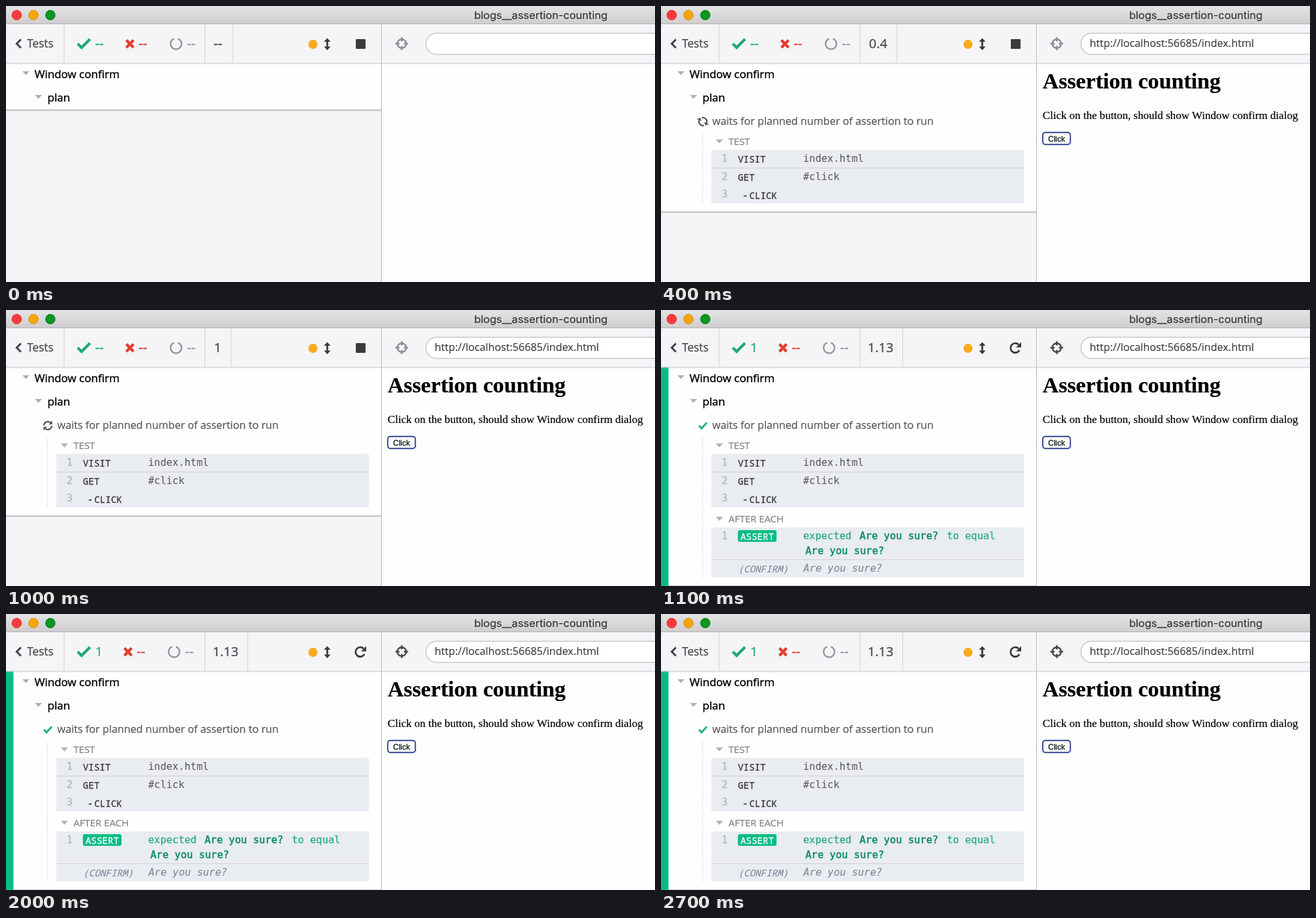
Recreate the animation shown at these times as an HTML page. Size 1000x425 px, loop 2800 ms.

```html
<!DOCTYPE html>
<html lang="en">
<head>
<meta charset="utf-8">
<title>Assertion counting</title>
<style>
html, body { margin: 0; width: 100%; height: 100%; overflow: hidden; background: #f5f4f6; }
svg { display: block; width: 100vw; height: 100vh; }
text { font: 16.25px "Open Sans", sans-serif; color: #55555a; fill: currentColor; stroke: currentColor; stroke-width: .2; white-space: pre; }
.bar { color: #404044; font-size: 17.3px; }
.num { font-size: 20px; }
.suite { font-size: 17.1px; color: #000; stroke-width: .4; }
.hook { font-size: 15px; color: #808087; }
.mono { font: 15.5px "DejaVu Sans Mono", monospace; stroke-width: 0; }
.cmd { font: 500 14.3px "Noto Sans Mono", "DejaVu Sans Mono", monospace; color: #36363b; stroke-width: .3; }
.idx { color: #a6adb8; text-anchor: middle; }
.serif { font: 17.1px "Liberation Serif", serif; color: #000; }
.ok { color: #1fa97a; stroke-width: .2; }
.strong { color: #0b8c5c; stroke-width: .5; }
.hint { color: #84849a; font-style: italic; stroke-width: .1; }
.dashes { stroke-width: .5; }
.line { stroke: #d3d2d5; fill: none; }
.caret { fill: #b0afb2; }
.row { fill: #e9ecf1; }
.stroke { fill: none; stroke-width: 2.4; }
</style>
</head>
<body>
<svg viewBox="0 0 1000 425" preserveAspectRatio="none">
  <defs>
    <linearGradient id="chrome" x2="0" y2="1">
      <stop stop-color="#e4e3e4"/><stop offset="1" stop-color="#cfcdcf"/>
    </linearGradient>
    <linearGradient id="shade" x2="0" y2="1">
      <stop stop-color="#a5a4a7"/><stop offset="1" stop-color="#f5f4f6"/>
    </linearGradient>
    <linearGradient id="fall" x2="0" y2="1">
      <stop stop-color="#d0cfd2"/><stop offset="1" stop-color="#d0cfd2" stop-opacity="0"/>
    </linearGradient>
    <path id="caret" class="caret" d="M0 0h11l-5.5 6z"/>
  </defs>

  <rect width="1000" height="425" fill="#f5f4f6"/>
  <rect x="579" y="88" width="421" height="337" fill="#fefefe"/>

  <!-- reporter panel -->
  <rect id="sheet" y="88" width="578" fill="#fefefe"/>
  <rect id="edge" width="578" height="3" fill="url(#shade)"/>
  <use href="#caret" x="25.2" y="100.5"/>
  <text class="suite" x="44" y="111">Window confirm</text>
  <use href="#caret" x="44.5" y="137"/>
  <text class="suite" x="64" y="147">plan</text>

  <g id="test">
    <text x="79" y="183">waits for planned number of assertion to run</text>
    <path id="rail" stroke="#c9c9cd" stroke-dasharray="1.5 1.5"/>
    <use href="#caret" x="84.5" y="205.5"/>
    <text class="hook" x="104" y="214">TEST</text>
    <rect class="row" x="77.5" y="221.5" width="481.5" height="82.5"/>
    <path class="line" d="M77.5 249.5H559"/>
    <text class="mono idx" x="98" y="240">1</text>
    <text class="cmd" x="118.5" y="241">VISIT</text>
    <text class="mono" x="219" y="240">index.html</text>
    <text class="mono idx" x="98" y="268">2</text>
    <text class="cmd" id="get" x="118.5">GET</text>
    <text class="mono" x="219" y="268">#click</text>
    <g id="pending">
      <rect x="77.5" y="277" width="481.5" height="27" fill="#dbe8f5"/>
      <rect x="77.5" y="277" width="2.5" height="27" fill="#3d88c4"/>
      <circle cx="98" cy="289.3" r="6.6" class="stroke" stroke="#6a9edc" stroke-dasharray="2.4 2.78"/>
    </g>
    <text class="mono idx" id="third" x="98" y="295">3</text>
    <text class="cmd" id="click" y="296.5"><tspan x="125.5">-</tspan><tspan x="136">CLICK</tspan></text>
  </g>

  <g id="sync" fill="none" stroke="#55555a" stroke-width="2.3">
    <path d="M-6 -1.2A6 6 0 0 1 4.6 -3.8M6 1.2A6 6 0 0 1 -4.6 3.8"/>
    <path stroke="none" fill="#55555a" d="M7.3 -6.8V-1H1.5zM-7.3 6.8V1H-1.5z"/>
  </g>

  <g id="done">
    <rect y="88" width="11.5" height="337" fill="#08bd82"/>
    <path class="stroke" stroke="#1fb17e" style="stroke-width:3" d="M58.5 178l4 4.2 8-8.7"/>
    <use href="#caret" x="84.5" y="318.5"/>
    <text class="hook" x="104" y="327">AFTER EACH</text>
    <rect class="row" x="77.5" y="335" width="481.5" height="77"/>
    <path class="line" d="M77.5 384.5H559"/>
    <text class="mono idx" x="98" y="353">1</text>
    <rect x="118.5" y="339" width="59.5" height="18" rx="3" fill="#08bd82"/>
    <text class="cmd" x="122.5" y="354" style="color:#fff">ASSERT</text>
    <text class="mono ok" x="219" y="353">expected</text>
    <text class="mono strong" x="306" y="353">Are you sure?</text>
    <text class="mono ok" x="440.5" y="353">to equal</text>
    <text class="mono strong" x="222.5" y="376">Are you sure?</text>
    <text class="cmd hint" x="119" y="404">(CONFIRM)</text>
    <text class="mono hint" x="219.5" y="403">Are you sure?</text>
  </g>

  <!-- page under test -->
  <g id="page">
    <text class="serif" x="588" y="127" style="font-size:34.2px;font-weight:700">Assertion counting</text>
    <text class="serif" x="588" y="173.5">Click on the button, should show Window confirm dialog</text>
    <rect x="588.2" y="194.7" width="42.5" height="18.6" rx="4" fill="#fff" stroke="#35458f" stroke-width="2"/>
    <text x="596.5" y="209" style="font:12px 'Liberation Sans',sans-serif;color:#000">Click</text>
  </g>

  <!-- toolbar -->
  <rect y="28" width="1000" height="60" fill="#f5f4f6"/>
  <rect y="87.5" width="1000" height="3" fill="url(#fall)"/>
  <path class="line" d="M89.5 28V88M306.5 28V88"/>
  <path class="line" id="split"/>
  <path d="M578.5 28V425" stroke="#b9b8bb"/>
  <path class="stroke" stroke="#404044" style="stroke-width:3" d="M23 51.5l-6.5 6.5 6.5 6.5"/>
  <text class="bar" x="32.5" y="64">Tests</text>
  <path class="stroke" stroke="#1fa97a" style="stroke-width:4.4" d="M110.5 58l6 6 13-13"/>
  <text class="bar num ok" id="passed" x="137.5" y="65"></text>
  <g id="counts">
    <path class="stroke" stroke="#e23d32" style="stroke-width:4.4" d="M185.5 52.5l11 11.5m0 -11.5l-11 11.5"/>
    <text class="bar num dashes" x="204.5" y="65" style="color:#e23d32">--</text>
    <path class="stroke" stroke="#98979b" d="M265 50.3A8.4 8.4 0 1 1 259 50.3"/>
    <text class="bar num dashes" x="279" y="65" style="color:#98979b">--</text>
  </g>
  <text class="bar num" id="timer" y="65"></text>
  <circle cx="473" cy="59" r="7" fill="#fca91c"/>
  <path fill="#38383b" d="M495 49.5l5 5.5h-3.6v7.5h3.6l-5 5.5-5-5.5h3.6V55H490z"/>
  <rect id="stop" x="539" y="51" width="15" height="15" rx="1" fill="#3b3b3e"/>
  <g id="reload">
    <path class="stroke" stroke="#3b3b3e" style="stroke-width:2.8" d="M552.3 62A7.3 7.3 0 1 1 551 53.2"/>
    <path fill="#3b3b3e" d="M555 49.5V57.5H547z"/>
  </g>
  <path id="aim" class="stroke" d="M603 58a6.8 6.8 0 1 0 13.6 0a6.8 6.8 0 1 0-13.6 0M609.8 48v6.5M609.8 61.5V68M600 58h6.5M613 58h6.5"/>
  <rect x="647" y="42" width="390" height="32.5" rx="16.2" fill="#fff" stroke="#c9c8cb" stroke-width="1.5"/>
  <text id="url" x="660.5" y="63.3" style="color:#404044">http://localhost:56685/index.html</text>

  <!-- window title -->
  <rect width="1000" height="28" fill="url(#chrome)"/>
  <path d="M0 27.5H1000" stroke="#b3b1b3"/>
  <circle cx="16.5" cy="14" r="7.4" fill="#fc3a3a" stroke="#e0302f"/>
  <circle cx="42.3" cy="14" r="7.4" fill="#f6a30c" stroke="#dc9110"/>
  <circle cx="68.3" cy="14" r="7.4" fill="#0a9420" stroke="#0b841d"/>
  <text x="721.5" y="20.3" style="font:16.5px Inter,sans-serif;color:#363537">blogs__assertion-counting</text>
</svg>
<script>
const LOOP = 2800, STEP = 100, FINISH = 11;
const $ = id => document.getElementById(id);
const set = (id, attrs) => {
  for (const k in attrs) $(id).setAttribute(k, attrs[k]);
};
const show = (id, on) => { $(id).style.display = on ? "" : "none"; };

// label, text x and divider x of the clock cell
function clock(step) {
  if (step === 0) return ["--", 320, 349.5];
  if (step >= FINISH) return ["1.13", 318.5, 372.5];
  if (step === 10) return ["1", 320.5, 346.5];
  return ["0." + step, 320.5, 363.5];
}

function draw(step) {
  const loaded = step > 0, done = step >= FINISH, pending = step === 1;
  const bottom = done ? 425 : loaded ? 317 : 160;
  const [label, x, split] = clock(step);

  for (const id of ["test", "page", "url"]) show(id, loaded);
  for (const id of ["done", "reload"]) show(id, done);
  show("sync", loaded && !done);
  show("stop", !done);
  show("pending", pending);
  show("third", !pending);

  set("sheet", { height: bottom - 88 });
  set("edge", { y: bottom - 0.5 });
  set("rail", { d: `M64 197V${done ? 412 : 304}` });
  set("get", { y: done ? 269 : 268.5 });
  $("click").style.color = pending ? "#6a9bcf" : "";
  set("sync", { transform: `translate(64.5 178) rotate(${step * 18 - 9})` });

  $("passed").textContent = done ? "1" : "--";
  $("passed").classList.toggle("dashes", !done);
  set("counts", { transform: `translate(${done ? -3 : 0} 0)` });
  $("timer").textContent = label;
  $("timer").classList.toggle("dashes", !loaded);
  set("timer", { x });
  set("split", { d: `M${split} 28V88` });
  set("aim", { stroke: done ? "#48474a" : "#8d8c90" });
}

const start = performance.now();
let last = -1;
function tick() {
  const step = Math.floor((performance.now() - start) % LOOP / STEP);
  if (step !== last) draw(last = step);
  requestAnimationFrame(tick);
}
tick();
</script>
</body>
</html>
```
